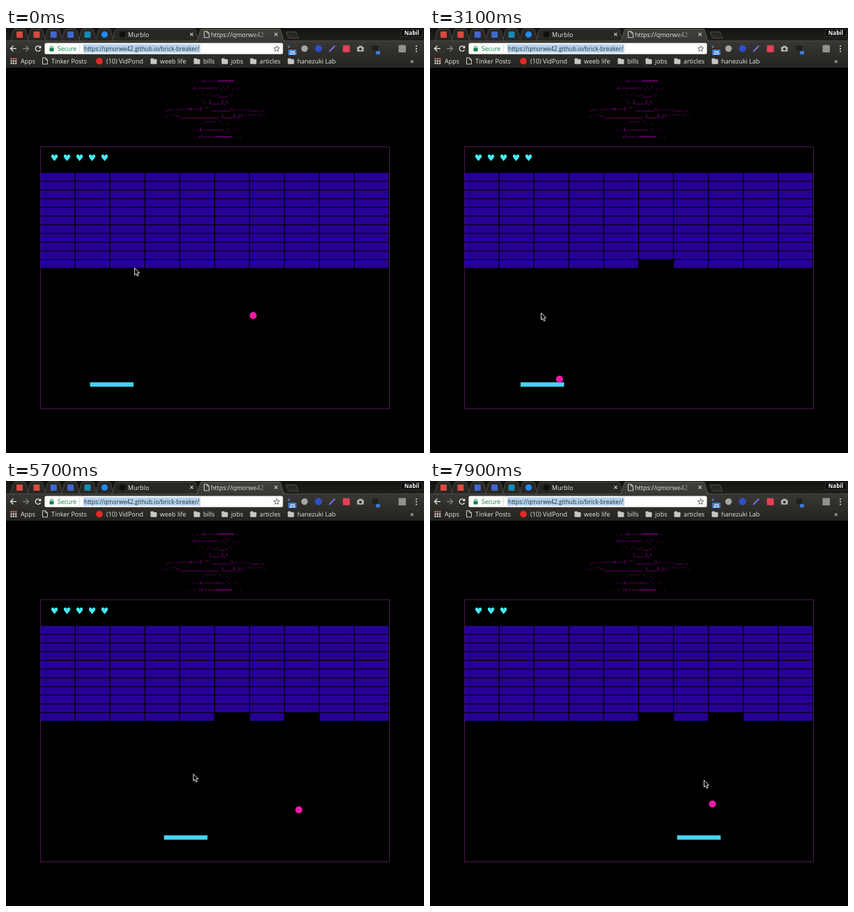
An HTML page with a canvas that plays this animation: 600x610 px, repeating every 8 s.

```html
<!DOCTYPE html>
<html lang="en">
<head>
<meta charset="utf-8">
<title>Brick breaker</title>
<style>
html, body { margin: 0; width: 100%; height: 100%; overflow: hidden; background: #000; }
canvas { display: block; }
</style>
</head>
<body>
<canvas id="stage" width="600" height="610"></canvas>
<script>
const LOOP = 8000, STEP = 100;
const UI = '"Open Sans", "Noto Sans", sans-serif';
const MONO = '"DejaVu Sans Mono", monospace';
const LIGHT = '#e9e7e1', EDGE = '#4b4945';
const stage = document.getElementById('stage');
const page = document.createElement('canvas');
page.width = 600;
page.height = 610;
let c = page.getContext('2d');

function rect(x, y, w, h, color) {
  c.fillStyle = color;
  c.fillRect(x, y, w, h);
}

function round(x, y, w, h, r, color) {
  c.fillStyle = color;
  c.beginPath();
  c.roundRect(x, y, w, h, r);
  c.fill();
}

function disc(x, y, r, color) {
  c.fillStyle = color;
  c.beginPath();
  c.arc(x, y, r, 0, Math.PI * 2);
  c.fill();
}

function arc(x, y, r, from, to, color, width) {
  c.beginPath();
  c.arc(x, y, r, from, to);
  c.strokeStyle = color;
  c.lineWidth = width;
  c.stroke();
}

function poly(points, fill, stroke, width = 1) {
  c.beginPath();
  points.forEach(([x, y]) => c.lineTo(x, y));
  if (fill) {
    c.closePath();
    c.fillStyle = fill;
    c.fill();
  }
  if (!stroke) return;
  c.strokeStyle = stroke;
  c.lineWidth = width;
  c.stroke();
}

const line = (points, color, width) => poly(points, null, color, width);

function text(str, x, y, size, color, font = UI, align = 'left', weight = '') {
  c.font = `${weight} ${size}px ${font}`;
  c.textAlign = align;
  c.fillStyle = color;
  c.fillText(str, x, y);
}

function shade(x0, y0, x1, y1, from, to) {
  const g = c.createLinearGradient(x0, y0, x1, y1);
  g.addColorStop(0, from);
  g.addColorStop(1, to);
  return g;
}

function tab(x, w, fill, edge) {
  const left = [[0, 18.5], [2, 17], [6, 2.5], [8, 1.5]];
  const right = left.map(([dx, y]) => [x + w - dx, y]).reverse();
  poly([...left.map(([dx, y]) => [x + dx, y]), ...right], fill, edge);
}

function cross(x, y) {
  for (const d of [-2.2, 2.2]) line([[x - 2.2, y - d], [x + 2.2, y + d]], '#c9c6be', 1.1);
}

function doc(x, y) {
  const w = 7, h = 9, fold = 2.6;
  line([[x + w - fold, y], [x, y], [x, y + h], [x + w, y + h], [x + w, y + fold],
    [x + w - fold, y], [x + w - fold, y + fold], [x + w, y + fold]], '#e4e2dc', 0.9);
}

function folder(x) {
  round(x, 43.5, 4.5, 3, 1, '#c9c7c2');
  round(x, 44.7, 9, 7, 1, '#c9c7c2');
}

// A straight arrow; dir -1 points left, 1 points right
function arrow(x, dir, color) {
  const tip = x + 4.2 * dir;
  line([[x - 4.2 * dir, 29.5], [tip, 29.5]], color, 1.3);
  line([[tip - 4 * dir, 25.5], [tip, 29.5], [tip - 4 * dir, 33.5]], color, 1.3);
}

function drawTabs() {
  rect(0, 0, 600, 19, shade(0, 0, 0, 19, '#141311', '#201f1c'));
  for (let i = 5; i >= 0; i--) tab(5 + i * 24.4, 29, '#282724', EDGE);
  tab(151, 127, '#282724', EDGE);
  poly([[402, 5.5], [416, 5.5], [420, 14.5], [406, 14.5]], '#282724', EDGE);

  ['#d84a3e', '#d84a3e', '#3f68cf', '#3f68cf', '#1689b4']
    .forEach((color, i) => round(15 + i * 24.4, 5, 9, 9, 1, color));
  disc(141.5, 9.3, 4.6, '#2189f3');
  disc(167, 9.3, 4.6, '#11100f');
  text('Murblo', 175, 12.5, 9, LIGHT);
  cross(266.5, 9.2);

  rect(0, 18, 600, 1, EDGE);
  tab(273, 127, shade(0, 1, 0, 19, '#42413c', '#383733'), '#5c5a54');
  rect(275, 18, 123, 2, '#383733');
  doc(284.5, 4.8);
  text('https://qmorwe42', 294, 12.5, 9, shade(350, 0, 378, 0, LIGHT, 'rgba(233,231,225,.15)'));
  cross(387.5, 9.2);
  round(567, 2, 31, 10.5, 1.5, '#33322f');
  round(568, 3, 29, 8.5, 1, '#060606');
  text('Nabil', 582.5, 10.2, 8, '#fff', UI, 'center', 'bold');
}

function drawExtensions() {
  disc(406, 27, 1.4, '#4e82d8');
  round(405, 31, 12, 8, 1, '#3979d0');
  text('25', 411, 37.7, 7, '#fff', UI, 'center', 'bold');
  disc(428.5, 29.6, 4.7, '#a6a5a1');
  disc(448.5, 29.6, 5, '#2d50c8');
  line([[464, 34], [472, 25.5]], '#7775e6', 2);
  round(483.5, 24.8, 10, 10, 1, '#e83f55');
  round(504, 27, 9.5, 6.8, 1, '#bab8b3');
  rect(506.5, 25.6, 4.5, 2, '#bab8b3');
  disc(508.7, 30.3, 2, '#33322f');
  round(526, 25, 8, 8, 1, '#201f1c');
  round(531, 33, 6, 5, 1, '#3979d0');
  round(563.5, 24.6, 10.5, 10.5, 1, '#92938f');
  for (let i = 0; i < 3; i++) disc(589, 26 + i * 3.7, 1, LIGHT);
}

function drawAddress() {
  round(55.5, 21.5, 342, 16, 2, '#fdfdfd');
  round(62.5, 28.5, 6, 5, 0.5, '#12824a');
  arc(65.5, 28, 1.9, Math.PI, 0, '#12824a', 1);
  text('Secure', 74, 32.8, 8.6, '#12824a');
  rect(105, 24, 0.7, 11, '#ccc');
  rect(111, 23.5, 168, 12, '#b4d3ee');
  text('https://qmorwe42.github.io/brick-breaker/', 112, 32.8, 8.4, '#26313b');
  const star = [];
  for (let i = 0; i <= 10; i++) {
    const a = i * Math.PI / 5 - Math.PI / 2, r = i % 2 ? 1.9 : 4.4;
    star.push([388.5 + r * Math.cos(a), 29.8 + r * Math.sin(a)]);
  }
  line(star, '#555', 0.9);
}

function drawToolbar() {
  rect(0, 19, 600, 38, shade(0, 19, 0, 57, '#383733', '#242320'));
  arrow(10.7, -1, LIGHT);
  arrow(28.3, 1, '#85837d');
  arc(46, 29.6, 3.7, 0.4, 5.5, LIGHT, 1.3);
  poly([[50.4, 25], [50.4, 29], [46.4, 29]], LIGHT);
  drawAddress();
  drawExtensions();

  for (let i = 0; i < 9; i++) {
    rect(6.5 + i % 3 * 3.3, 43 + Math.floor(i / 3) * 3.3, 2.3, 2.3, i < 3 ? '#e26b5e' : '#d4d1cb');
  }
  doc(52.5, 42.8);
  disc(134, 47.5, 4.8, '#e32a25');
  const label = (str, x) => text(str, x, 51, 9, LIGHT);
  label('Apps', 21);
  label('Tinker Posts', 65);
  label('(10) VidPond', 144);
  [['weeb life', 221], ['bills', 283], ['jobs', 323], ['articles', 364], ['hanezuki Lab', 418]]
    .forEach(([str, x]) => { folder(x - 13.5); label(str, x); });
  text('»', 580, 51, 11, LIGHT);
}

function drawBanner() {
  const u = n => '_'.repeat(n);
  [
    '. . -)-----+=====+ .',
    "-)----~~~~~ .',' . .",
    ". ' .`..:___,'.",
    "'. |____[_\\",
    "_,....----c---|''''" + u(8) + '|,......____ _',
    ".. ''-:" + u(16) + " |____[_||'''''''' .",
    ".''''' '. .",
    ". -)----~~~~~ '. '.",
    '. . -)-----+=====+ . .'
  ].forEach((row, i) => text(row, 300, 78 + i * 10, 5.75, '#b400b4', MONO, 'center', 'bold'));
}

function brick(col, row, pad, color) {
  rect(49.8 + col * 50.07 - pad, 208 + row * 12.5 - pad, 48.7 + 2 * pad, 11.3 + 2 * pad, color);
}

function drawPage() {
  rect(0, 0, 600, 610, '#000');
  drawTabs();
  drawToolbar();
  drawBanner();
  c.strokeStyle = '#4d154f';
  c.lineWidth = 1;
  c.strokeRect(49.5, 170.5, 501, 376);
  for (let i = 0; i < 110; i++) brick(i % 10, Math.floor(i / 10), 0, '#270096');
}

const clamp = (v, lo, hi) => Math.min(hi, Math.max(lo, v));
const linear = f => f;
const smooth = f => (1 - Math.cos(Math.PI * f)) / 2;

// Value at time t between [time, value] keys
function at(keys, t, ease) {
  const i = clamp(keys.findIndex(k => k[0] > t), 1, keys.length - 1);
  const [t0, v0] = keys[i - 1], [t1, v1] = keys[i];
  return v0 + (v1 - v0) * ease(clamp((t - t0) / (t1 - t0), 0, 1));
}

// Ball: every life starts at SERVE, heading down at 45 degrees
const SERVE = { x: 300, y: 358 }, TOP = 344, FLOOR = 506, WALL = 552;
const LOST = [5760, 7187];
// Vertical distance covered during the first life
const TRAVEL = [[0, 54.7], [1000, 182], [2000, 322], [4200, 618], [5700, 826]];
// Turning points of the hand-moved paddle and pointer
const PADDLE = [[-300, 47], [750, 438], [1000, 438], [2050, 241], [3100, 130], [3550, 132],
  [4700, 170], [5400, 172], [5850, 245], [6500, 109], [7300, 436], [7650, 325], [8050, 368]];
const POINTER = [[0, 344], [800, 429], [2000, 407], [4200, 410], [7100, 429]];

function ballAt(t) {
  if (t >= LOST[0]) {
    const d = (t - (t < LOST[1] ? LOST[0] : LOST[1])) * (t < LOST[1] ? 0.138 : 0.148);
    return [SERVE.x + d, SERVE.y + d];
  }
  const d = at(TRAVEL, t, linear);
  const span = FLOOR - TOP, drop = FLOOR - SERVE.y;
  // Each paddle hit changes the slope
  const x = SERVE.x + Math.min(d, drop) - 0.814 * clamp(d - drop, 0, 2 * span)
    + 1.605 * Math.max(0, d - drop - 2 * span);
  // The last fall misses the paddle
  const past = d - drop - 3 * span;
  const phase = Math.abs(d - drop) % (2 * span);
  const y = past > 0 ? TOP + past : FLOOR - Math.min(phase, 2 * span - phase);
  return [WALL - Math.abs(WALL - x), y];
}

function drawPointer(x, y) {
  const shape = [[0, 0], [0, 10], [2.2, 8], [3.9, 11.6], [5.6, 10.8], [4, 7.2], [7, 7], [0, 0]];
  poly(shape.map(([dx, dy]) => [x + 0.5 + dx, y + 0.5 + dy]), '#000', '#e8e8e8');
}

function drawGame(t) {
  c.drawImage(page, 0, 0);
  if (t > 1900) brick(5, 10, 0.6, '#000');
  if (t >= 4300) brick(7, 10, 0.6, '#000');
  const lives = 5 - LOST.filter(end => t >= end).length;
  for (let i = 0; i < lives; i++) {
    text('♥', 69.5 + i * 18, 191, 13, '#46ebf6', '"DejaVu Sans", sans-serif', 'center');
  }
  c.save();
  c.beginPath();
  c.rect(49, 171, 502, 375.5);
  c.clip();
  rect(at(PADDLE, t, smooth), 508.5, 62.5, 6.3, '#44d4f3');
  disc(...ballAt(t), 5.1, '#f01aa8');
  c.restore();
  // The paddle trails the pointer slightly
  drawPointer(at(PADDLE, t + 70, smooth) + 29, at(POINTER, t, smooth));
}

drawPage();
c = stage.getContext('2d');
const start = performance.now();
function tick() {
  const t = (performance.now() - start) % LOOP;
  drawGame(Math.floor(t / STEP) * STEP);
  requestAnimationFrame(tick);
}
tick();
</script>
</body>
</html>
```
